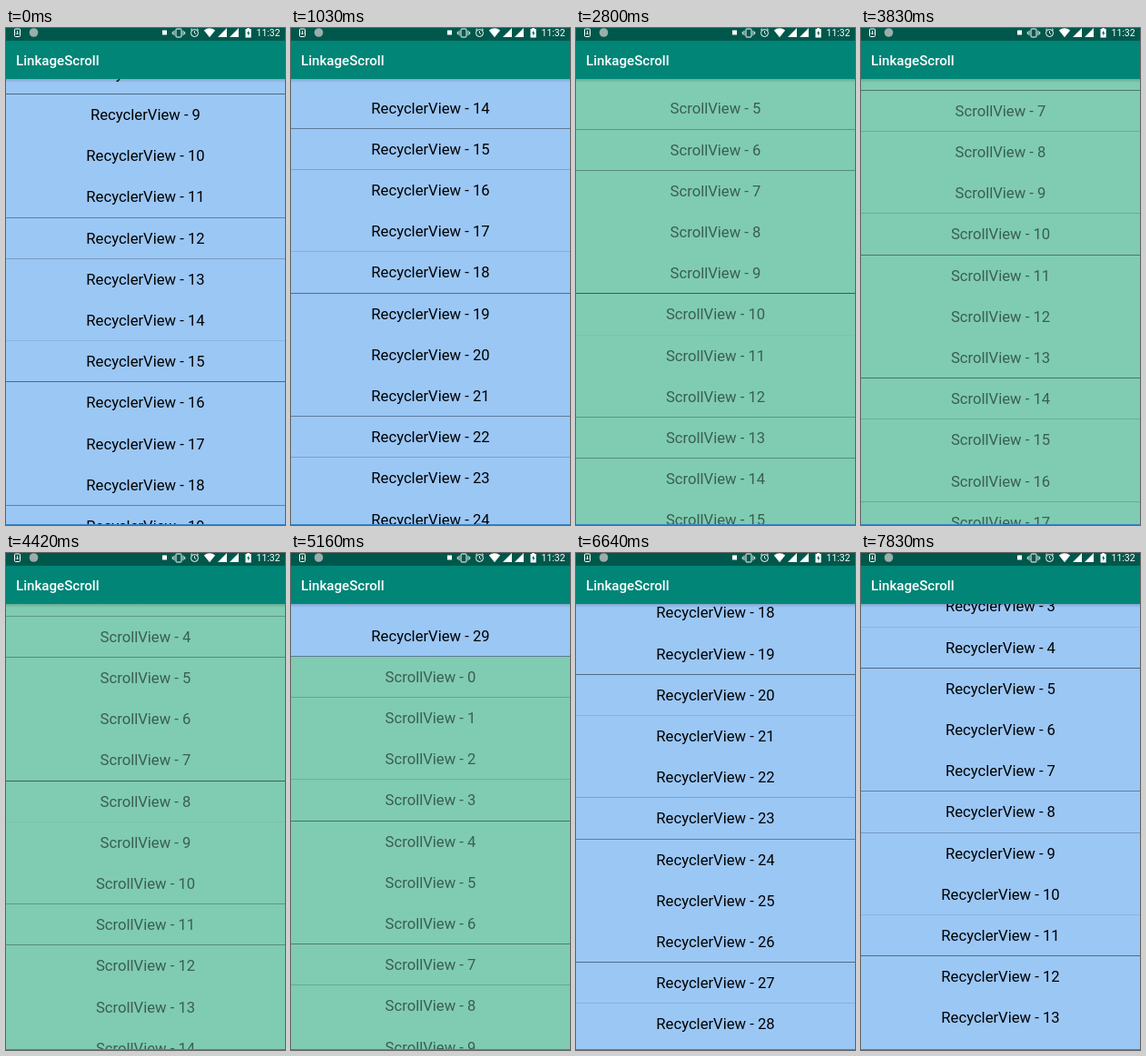
An HTML page that plays this animation: 307 px wide and 546 px high, repeating every 8.24 s.

```html
<!DOCTYPE html>
<html lang="en">
<head>
<meta charset="utf-8">
<title>LinkageScroll</title>
<style>
  html, body { margin: 0; width: 100%; height: 100%; overflow: hidden; }
  body { font-family: Roboto, "Noto Sans", sans-serif; }
  #stage { position: relative; width: 307px; height: 546px; overflow: hidden; background: #9bc7f5; }
  .row {
    position: absolute; left: 0; top: 0; width: 307px; height: 47px;
    line-height: 46px; font-size: 16.65px; text-align: center; white-space: nowrap;
    background: #9bc7f5; color: #000;
  }
  .row.green { background: #7fccb2; color: rgba(0, 0, 0, .54); }
  .row::before {
    content: ""; position: absolute; left: 0; top: -1px; width: 100%; height: 1px;
    background: #000; opacity: var(--line, 0);
  }
  #bar {
    position: absolute; left: 0; top: 14px; width: 307px; height: 42px;
    background: #008577; color: #fff;
    font-size: 15.1px; font-weight: 500; line-height: 44px; text-indent: 11px;
  }
  #bar::after {
    content: ""; position: absolute; left: 0; top: 42px; width: 100%; height: 4px;
    background: linear-gradient(rgba(0, 0, 0, .16), transparent);
  }
  #status { position: absolute; left: 0; top: 0; width: 307px; height: 14px; background: #00574b; }
  #edge { position: absolute; left: 0; top: 545px; width: 307px; height: 1px; background: #3a86c8; }
</style>
</head>
<body>
<div id="stage">
  <div id="list"></div>
  <div id="bar">LinkageScroll</div>
  <svg id="status" viewBox="0 0 307 14" fill="#fff">
    <g fill="none" stroke="#fff">
      <rect x="9.5" y="1" width="6" height="8.5" rx="1"/>
      <path d="M12.5 3v4M11 5.5l1.5 1.5L14 5.5" stroke-width=".9"/>
      <rect x="187" y="1" width="6" height="9" rx=".8"/>
      <path d="M185 2.8v5.4M195 2.8v5.4M183.3 4v3M196.7 4v3" stroke-width=".9"/>
      <circle cx="207.5" cy="5.5" r="4"/>
      <path d="M207.5 3.2v2.5l1.6 1M203 2.4l2-1.8M212 2.4l-2-1.8" stroke-width=".9"/>
    </g>
    <circle cx="30.5" cy="5" r="4.8" fill="#9aaeaa"/>
    <rect x="172" y="2.5" width="5" height="5"/>
    <path d="M224 10.3L217.8 2.4Q224 -2 230.2 2.4Z"/>
    <path d="M233 10h10V0ZM246 10h10V0Z"/>
    <path d="M263.5 1h1.8V0h2.6v1h1.8v9.5h-6.2z"/>
    <path d="M267.2 2.6l-2 3.4h1.2v2.8l2-3.6h-1.2z" fill="#00574b"/>
    <text x="275.5" y="9" font-size="10.5">11:32</text>
  </svg>
  <div id="edge"></div>
</div>
<script>
  const LOOP = 8240, STEP = 147.5, LEAD = 7;
  const PITCH = 45.2, BLUE_ROWS = 30, ROWS = 52;
  const TOP = 23, TURN = 26, END = 53;

  // picture step, scroll offset
  const KEYS = [
    [0, 334.9], [7, 568.3], [14, 1202.1], [TOP, 1625],
    [TURN, 1604.6], [35, 1243.3], [45, 771.3], [END, 100.2]
  ];

  const list = document.getElementById("list");
  const rows = Array.from({ length: ROWS }, (_, i) => {
    const row = document.createElement("div");
    const green = i >= BLUE_ROWS;
    row.className = green ? "row green" : "row";
    row.textContent = green ? "ScrollView - " + (i - BLUE_ROWS) : "RecyclerView - " + i;
    return list.appendChild(row);
  });

  function slope(k) {
    if (k < 0 || k >= KEYS.length - 1) return 0;
    return (KEYS[k + 1][1] - KEYS[k][1]) / (KEYS[k + 1][0] - KEYS[k][0]);
  }

  // Speed at a key: the mean of both sides, at rest where the direction turns.
  function speed(k) {
    const a = slope(k - 1), b = slope(k);
    return a * b > 0 ? (a + b) / 2 : 0;
  }

  function scrollAt(step) {
    let k = 0;
    while (k < KEYS.length - 2 && step >= KEYS[k + 1][0]) k++;
    const [x0, s0] = KEYS[k], [x1, s1] = KEYS[k + 1];
    const d = x1 - x0, u = (step - x0) / d, w = 1 - u;
    return s0 * w * w * (1 + 2 * u) + s1 * u * u * (3 - 2 * u)
         + d * u * w * (speed(k) * w - speed(k + 1) * u);
  }

  // Hairlines alias against a slightly finer grid, so only some show.
  function lineAlpha(y) {
    const x = y * 1.0019;
    return .55 * Math.max(0, 1 - Math.abs(x - Math.round(x)) / .3);
  }

  function draw(step) {
    const scroll = scrollAt(step);
    rows.forEach((row, i) => {
      const y = PITCH * i - scroll;
      row.style.transform = `translateY(${Math.round(y) + 1}px)`;
      row.style.setProperty("--line", lineAlpha(y).toFixed(3));
    });
  }

  const start = performance.now();
  let last = -1;
  function frame() {
    const t = Math.max(0, performance.now() - start) % LOOP;
    let step = Math.min(END, Math.floor((t + LEAD) / STEP));
    if (step > TOP && step < TURN) step = TOP;
    if (step !== last) draw(last = step);
    requestAnimationFrame(frame);
  }
  frame();
</script>
</body>
</html>
```
